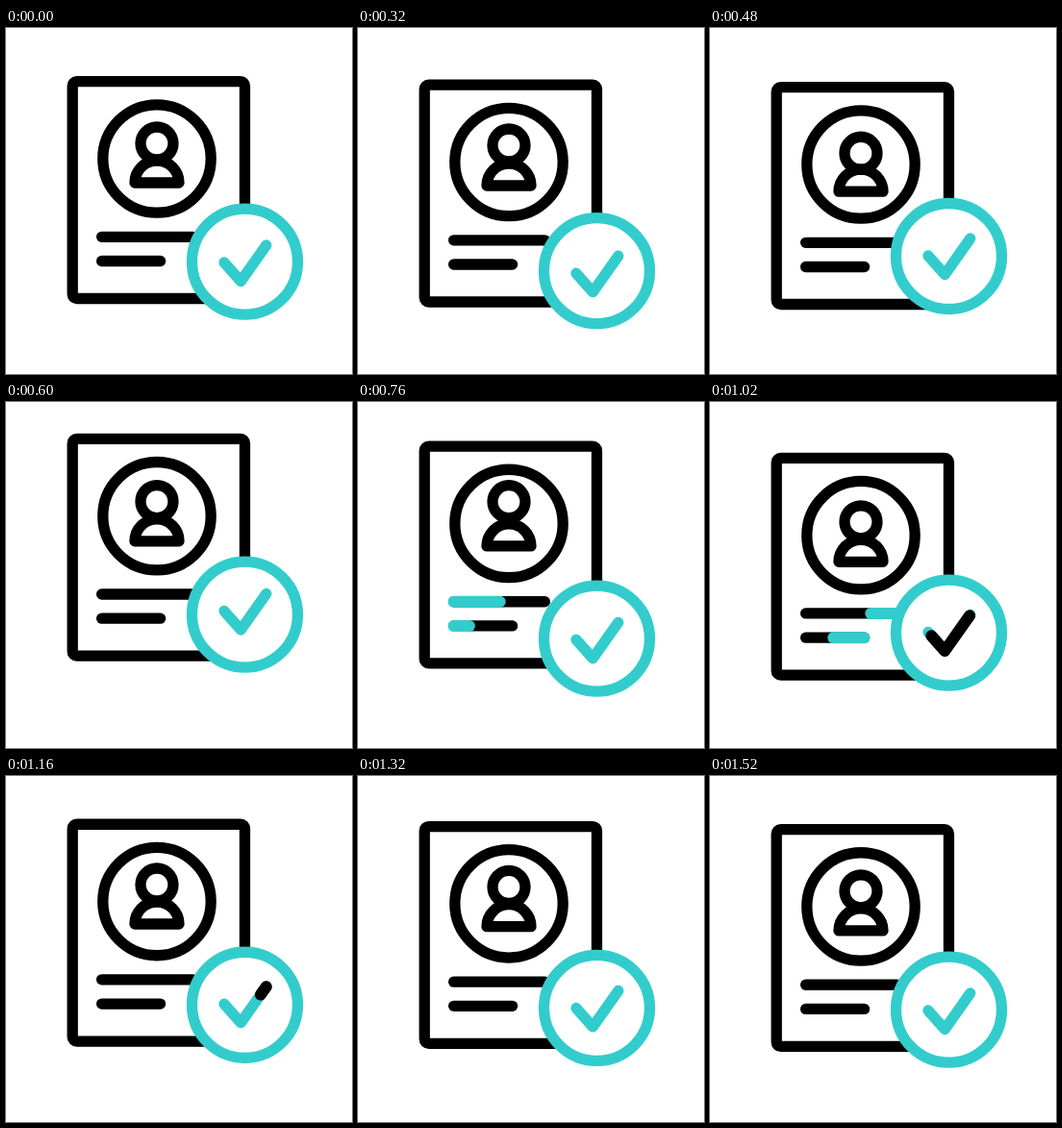
These frames come from a looping animation (360 by 360 pixels, 1660 ms). An HTML page with a canvas:

```html
<!DOCTYPE html>
<html lang="en">
<head>
<meta charset="utf-8">
<title>Approved profile</title>
<style>
  html, body { margin: 0; width: 100%; height: 100%; overflow: hidden; background: #fff; }
  canvas { display: block; width: 360px; height: 360px; }
</style>
</head>
<body>
<canvas id="stage"></canvas>
<script>
const LOOP = 1660;
const BLACK = '#000', TEAL = '#33cccc', WHITE = '#fff';
const STROKE = 11.3;

const canvas = document.getElementById('stage');
const ctx = canvas.getContext('2d');
const scale = window.devicePixelRatio || 1;
canvas.width = canvas.height = 360 * scale;

// Sine ease between two moments, clamped to 0..1
function ease(t, from, to) {
  const u = Math.min(1, Math.max(0, (t - from) / (to - from)));
  return (1 - Math.cos(Math.PI * u)) / 2;
}

// Vertical hop: crouch, jump, land, rebound, rest
const BEATS = [200, 360, 600, 840, 1080, 1480];
function hop(t, [crouch, jump, land, rebound]) {
  const heights = [0, crouch, jump, land, rebound, 0];
  let y = 0;
  for (let i = 1; i < BEATS.length; i++) {
    y += (heights[i] - heights[i - 1]) * ease(t, BEATS[i - 1], BEATS[i]);
  }
  return y;
}

const MAIN_HOP = [11, -22, 11, -5.5];
const HEAD_HOP = [13, -26, 12, -7];
const BODY_HOP = [13, -23, 15, -7];
const CHECK_HOP = [13, -26.5, 13, -7.5];

function stroke(color, width = STROKE) {
  ctx.strokeStyle = color;
  ctx.lineWidth = width;
  ctx.stroke();
}

function circle(x, y, r) {
  ctx.beginPath();
  ctx.arc(x, y, r, 0, Math.PI * 2);
}

function shifted(dy, draw) {
  ctx.save();
  ctx.translate(0, dy);
  draw();
  ctx.restore();
}

// Traces the part of a polyline between two fractions of its length
function trim(points, from, to) {
  const lengths = points.slice(1).map(([x, y], i) =>
    Math.hypot(x - points[i][0], y - points[i][1]));
  const total = lengths.reduce((a, b) => a + b);
  let walked = 0;
  let started = false;
  ctx.beginPath();
  lengths.forEach((length, i) => {
    const a = Math.max(0, (from * total - walked) / length);
    const b = Math.min(1, (to * total - walked) / length);
    walked += length;
    if (a >= b) return;
    const at = k => points[i].map((p, axis) => p + (points[i + 1][axis] - p) * k);
    if (!started) ctx.moveTo(...at(a));
    started = true;
    ctx.lineTo(...at(b));
  });
}

// A base line with a second colour sweeping through it
function sweptLine(points, base, accent, from, to) {
  trim(points, 0, 1);
  stroke(base);
  if (to - from > 0.001) {
    trim(points, from, to);
    stroke(accent, 12);
  }
}

function drawSheet(t) {
  ctx.beginPath();
  ctx.roundRect(69.2, 55.7, 179.3, 225.8, 4.5);
  stroke(BLACK);
  circle(157, 136, 56.2);
  stroke(BLACK);
  sweptLine([[99.6, 217.3], [194.4, 217.3]], BLACK, TEAL,
    ease(t, 880, 1100), ease(t, 650, 870));
  sweptLine([[99.6, 242.5], [160.6, 242.5]], BLACK, TEAL,
    ease(t, 915, 1135), ease(t, 685, 905));
}

function drawHead() {
  circle(157, 120, 17);
  stroke(BLACK);
}

function drawBody() {
  ctx.beginPath();
  ctx.arc(157, 161, 23, Math.PI, 0);
  ctx.closePath();
  stroke(BLACK);
}

function drawBadge() {
  circle(248.5, 243.2, 55);
  ctx.fillStyle = WHITE;
  ctx.fill();
  stroke(TEAL);
}

function drawCheck(t) {
  sweptLine([[227, 244], [244.3, 263.5], [270.8, 226]], TEAL, BLACK,
    ease(t, 980, 1220), ease(t, 800, 1040));
}

function render(t) {
  ctx.setTransform(scale, 0, 0, scale, 0, 0);
  ctx.fillStyle = WHITE;
  ctx.fillRect(0, 0, 360, 360);
  ctx.lineCap = ctx.lineJoin = 'round';

  shifted(hop(t - 60, MAIN_HOP), () => drawSheet(t));
  shifted(hop(t - 80, HEAD_HOP), drawHead);
  shifted(hop(t - 70, BODY_HOP), drawBody);
  shifted(hop(t, MAIN_HOP), drawBadge);
  shifted(hop(t, CHECK_HOP), () => drawCheck(t));
}

const start = performance.now();
function tick() {
  render((performance.now() - start) % LOOP);
  requestAnimationFrame(tick);
}
tick();
</script>
</body>
</html>
```
